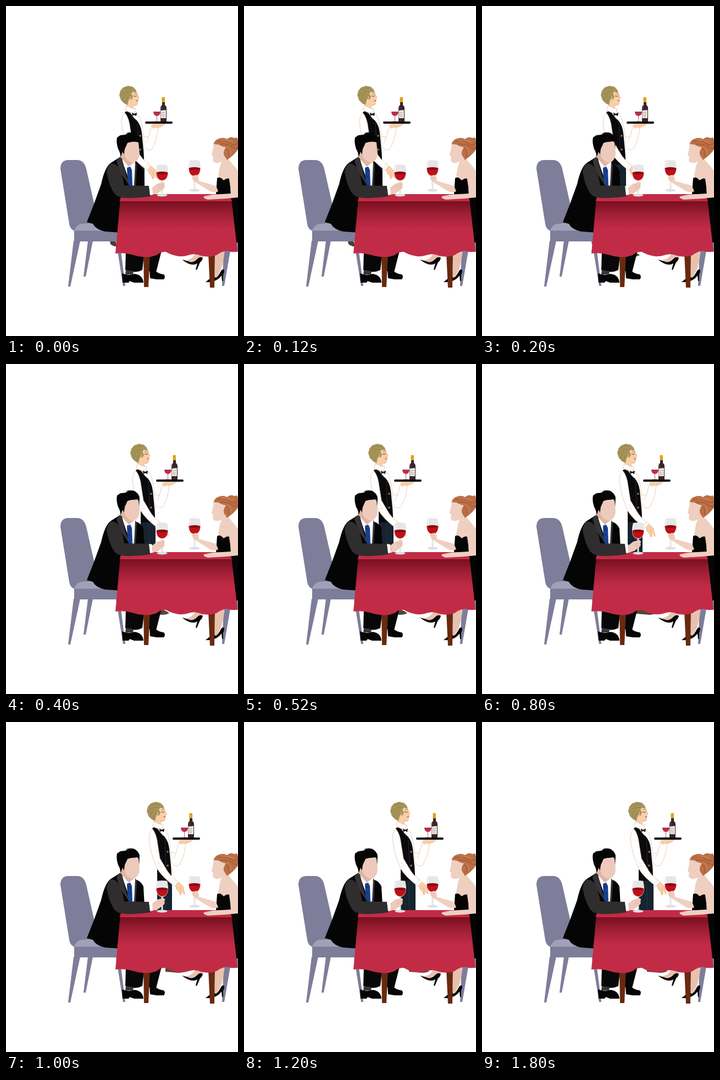
An HTML page with a canvas that plays this animation: 422x600 px, repeating every 2.2 s.

```html
<!DOCTYPE html>
<html lang="en">
<head>
<meta charset="utf-8">
<title>Dinner for two</title>
<style>
html, body { margin: 0; width: 100%; height: 100%; overflow: hidden; background: #fff; }
canvas { display: block; width: 422px; height: 600px; }
</style>
</head>
<body>
<canvas id="stage"></canvas>
<script>
const W = 422, H = 600, LOOP = 2200, STEP = 200, STRIDE = 10, LAST = 6;
const canvas = document.getElementById('stage');
const ctx = canvas.getContext('2d');
const ratio = window.devicePixelRatio || 1;
canvas.width = W * ratio;
canvas.height = H * ratio;

const SKIN = '#efcfc0', FACE = '#edcabb', SHADE = '#dfb5a3', LEG = '#e8c1ae';
const BLACK = '#050505', SLEEVE = '#2f2d2e';
const CHAIR = '#7e7d9a', SEAT = '#a0a1b9', WOOD = '#69290f', CLOTH = '#c22b46';
const WAITER_SKIN = '#f9cfa8', LINE = '#e3b99a';

function fill(color, d) {
  ctx.fillStyle = color;
  ctx.fill(new Path2D(d));
}

function line(color, width, d) {
  ctx.strokeStyle = color;
  ctx.lineWidth = width;
  ctx.stroke(new Path2D(d));
}

function outlined(color, edge, d) {
  fill(color, d);
  line(edge, 0.7, d);
}

function oval(color, x, y, rx, ry) {
  ctx.fillStyle = color;
  ctx.beginPath();
  ctx.ellipse(x, y, rx, ry, 0, 0, Math.PI * 2);
  ctx.fill();
}

function fade(y0, y1, ...colors) {
  const g = ctx.createLinearGradient(0, y0, 0, y1);
  colors.forEach((c, i) => g.addColorStop(i / (colors.length - 1), c));
  return g;
}

function waiterHead() {
  fill(WAITER_SKIN, 'M219 168 L219 185 L233 188 L232 181 Q238 182 239 178 L240 171 L242 167 L238 157 L226 156Z');
  line('#d99d78', 0.6, 'M238 158 L239 162 L242 167 L240 169 L240 173 L239 178 Q237 182 231 180');
  line('#4b3424', 0.9, 'M232 163.5 Q235 165 238 163.5');
  line('#8a7440', 0.7, 'M232 160 Q235 158.5 238 160');
  line('#cf4d46', 1.3, 'M236.5 172.5 L240 172');
  fill('#a59359', 'M206 162 L208 154 L213 148 L222 145 L231 147 L236 152 L238 158 L231 156 L228 159 L231 165 L228 171 L225 168 L223 172 L221 180 L215 177 L209 171Z');
  line('#8a7947', 0.7, 'M211 154 Q219 147 229 150 M209 163 Q215 153 228 156 M213 173 Q213 163 221 158 M218 177 Q217 169 224 163');
  line('#eab98c', 1.2, 'M225 164 Q228 166 226 170');
}

function serving() {
  fill(WAITER_SKIN, 'M265 219 Q264 214 271 213 H289 Q294 214 288 216 Q281 221 274 221 L267 223Z');
  line('#dba582', 0.6, 'M288 216 Q281 221 274 221');
  // glass
  fill('#b62f4b', 'M268 192 H281 Q281 199 274.5 200 Q268 199 268 192Z');
  line('#a83b50', 0.8, 'M274.5 200 V210 M270 210 H279');
  // bottle
  fill('#38252a', 'M284 173 H289 V180 Q292 182 292 186 V211 H281 V186 Q281 182 284 180Z');
  fill('#dca514', 'M283.5 166 Q286.5 165 289 166 V175 H283.5Z');
  fill('#ece6df', 'M281.5 190 L291 189 V204 H281.5Z');
  line('#9c8c85', 0.8, 'M283 194 H289 M283 198 H289 M284 201 H288');
  line('#6e5055', 1, 'M283 183 V189');
  ctx.fillStyle = '#0d080b';
  ctx.beginPath();
  ctx.roundRect(253, 210, 50, 4, 2);
  ctx.fill();
}

function waiter() {
  fill('#4e3c30', 'M189 427 L199 428 L203 437 Q196 438 190 433Z');
  fill('#594535', 'M240 446 L262 445 Q274 450 277 453 Q272 456 264 456 L240 454Z');
  fill('#17232e', 'M225 262 L250 260 L252 300 V350 H225Z');
  line('#2b3945', 0.8, 'M239 290 L241 342');
  // far arm and shirt front
  outlined('#fff', LINE, 'M231 190 Q242 196 245 207 Q249 222 250 237 L259 239 L265 217 L277 219 Q276 240 266 259 Q262 264 255 260 L247 251 L235 225 L225 194Z');
  line(LINE, 0.6, 'M250 237 L251 253 M259 239 L255 249');
  waiterHead();
  fill('#090a0c', 'M216 193 L223 190 Q230 202 238 208 Q245 216 247 230 L250 262 L251 288 H226 L225 268 Q229 250 225 230Z');
  line('#30343a', 0.8, 'M226 194 Q234 207 239 211 L242 280');
  oval('#a77a55', 244, 236, 1.7, 1.7);
  oval('#a77a55', 244, 261, 1.7, 1.7);
  outlined('#fff', '#dfb89f', 'M219 181 L230 186 L236 187 L234 194 L226 194 L217 190Z');
  fill('#0b0b0d', 'M229 194 L233 196 L238 194 L237 200 L233 198 L230 200Z');
  // near arm
  fill(WAITER_SKIN, 'M258 295 L264 291 L272 299 L274 309 L276 314 L272 312 L269 305 L270 314 L267 315 L264 308 L260 304Z');
  line('#d89c72', 0.7, 'M258 296 L261 304 L265 309 L267 315 M266 301 L270 311 M264 291 L272 299 L275 313');
  outlined('#fff', '#dfb89f', 'M216 194 Q211 199 210 210 Q212 231 217 246 L225 267 Q235 283 257 299 L263 290 Q248 280 240 265 L230 248 L226 223 Q224 203 216 194Z');
  line(LINE, 0.6, 'M225 255 L231 259 M226 262 L233 263 M254 294 L259 287');
  serving();
}

function chairs() {
  fill(CHAIR, 'M99 296 Q99 280 114 280 H129 Q142 280 146 296 L170 402 L130 410 Q117 409 115 396Z');
  fill(CHAIR, 'M123 427 H135 L117 510 H113Z M149 427 H158 L145 492 H141Z M200 427 L209 445 L217 509 H213Z');
  fill(SEAT, 'M124 409 Q127 398 137 396 L170 394 L207 411Z');
  fill(CHAIR, 'M124 408.500 H207 V428 H124Z');
  fill(CHAIR, 'M396 445 H408 L397 509 H393Z M411 420 H422 V447 H405Z');
}

function legs() {
  fill('#080808', 'M218 445 H252 L248 480 Q234 487 217 480Z M251 445 H283 L273 484 L259 482Z');
  fill('#3a3637', 'M218 480 L232 482 L231 488 H217Z');
  fill(BLACK, 'M211 486 Q222 491 234 487 Q249 489 250 503 H233 L225 500 L223 503 H212Z M261 479 L272 482 Q278 487 287 488 Q291 492 287 497 H274 L262 495Z');
  fill(LEG, 'M329 462 Q338 461 345 450 H364 L355 460 L347 467 L333 469Z');
  fill(LEG, 'M380 445 L398 443 Q396 464 391 479 L384 492 L377 498 L380 479Z');
  fill(BLACK, 'M320 461 L331 464 Q340 469 349 459 Q353 455 358 458 Q357 463 353 466 L347 480 L345 479 L348 468 Q338 475 320 461Z');
  fill(BLACK, 'M363 502 Q372 494 379 492 Q382 499 391 482 Q393 477 397 480 Q397 486 395 488 L395 500 H393 L392 490 Q383 503 363 502Z');
  fill(WOOD, 'M250 450 H262 L259 511 H251Z M368 450 H380 L379 512 H371Z');
}

function manBody() {
  fill(BLACK, 'M207 275 L191 285 Q180 292 173 324 L160 360 L147 393 L158 396 Q163 406 180 410 L208 412 L215 349 L252 335 L250 299 Q245 289 237 287 L226 281Z');
  fill('#fff', 'M210 276 L235 284 L236 296 L233 327 L228 327 Q218 303 210 276Z');
  fill(SHADE, 'M208 262 L216 258 L234 284 L223 292 L211 278 Q208 274 208 262Z');
  fill('#193f91', 'M220 294 L226 292 L229 298 L230 326 L225 328 L221 322Z');
  line('#0c275e', 1, 'M221 299 L228 302 M223 309 L229 315');
  fill('#353335', 'M206 275 L211 277 Q216 303 224 326 L208 303 L201 282Z M235 284 L238 289 L236 327 L233 327Z');
  fill(BLACK, 'M208 276 Q209 268 204 260 Q200 248 202 239 L208 235 L217 234 L222 231 L216 232 Q226 228 234 231 L239 235 Q243 240 243 244 L242 262 L239 246 L222 249 L216 262 L215 270 L212 265Z');
  fill(FACE, 'M221 249 Q232 245 241 248 L243 268 Q242 283 230 285 Q218 282 215 269 L216 260Z');
}

function womanBody() {
  fill(SKIN, 'M394 267 Q394 281 389 292 L386 309 Q390 320 403 324 L422 340 V300 Q414 289 404 278Z');
  fill(SKIN, 'M378 246 L377 258 L374 271 L377 274 L376 281 Q380 288 390 284 L398 278 L400 255Z');
  fill(BLACK, 'M384 313 Q389 309 396 317 Q402 312 406 314 L409 334 L422 348 V430 H408 L401 353 L382 342Z');
  fill('#bb6f46', 'M378 250 Q381 242 388 241 Q395 238 402 242 Q409 236 415 240 L420 239 L422 243 V261 Q415 271 402 280 L399 275 Q394 270 397 262 L400 257 Q391 255 387 252 L378 251Z');
  line('#96502e', 1, 'M384 247 Q397 242 406 249 T422 249 M389 251 Q402 250 411 256 T421 257 M400 259 Q407 262 405 274');
  line('#d4946a', 1, 'M391 244 Q403 243 414 247 M402 255 Q413 264 408 270');
}

function table() {
  fill(fade(352, 405, '#730d1b', '#a01f36', CLOTH), 'M208 350 H410 L421 446 Q413 449 402 445 Q392 446 383 453 Q369 458 355 454 Q343 449 332 453 Q320 457 309 454 Q299 452 291 447 Q281 446 274 453 Q261 458 248 456 Q238 455 229 452 Q214 448 199 450Z');
  fill(CLOTH, 'M215 342 H406 L411 355 H207 Q208 345 215 342Z');
}

function glass(x, y, stem) {
  ctx.save();
  ctx.translate(x, y);
  fill('#e6e6e6', `M-9 0 Q0 -1.500 9 0 C13 14 11 27 1.500 29 V${stem} H-1.500 V29 C-11 27 -13 14 -9 0Z`);
  fill('#c01019', 'M-10.500 14 H10.500 C10 23 6 28 0 28 S-10 23 -10.500 14Z');
  oval('#8d0711', 0, 14.5, 10.3, 2.5);
  line('#f7f7f7', 1.2, 'M-7.500 3 Q-9 8 -8.500 11');
  oval('#dedfe0', 0, stem + 1, 9.5, 2.5);
  ctx.restore();
}

function arms() {
  // man
  fill(SLEEVE, 'M191 286 Q201 286 206 296 Q213 310 215 326 L260 327 L263 346 Q240 350 218 349 Q204 349 197 341 Q187 326 183 302 Q184 291 191 286Z');
  fill('#fff', 'M260 327 L266 328 L267 343 L262 344Z');
  glass(284, 289, 54);
  fill(FACE, 'M266 330 L275 323 L286 320 Q291 322 288 326 Q290 330 286 333 L277 340 L267 343Z');
  line('#d8aa98', 0.7, 'M277 326 L288 326 M278 330 L287 330');
  // woman
  glass(343, 281, 53);
  fill(SKIN, 'M339 309 L346 307 Q352 310 351 318 L382 327 L386 337 Q379 341 370 336 L344 320 Q337 316 339 309Z');
  line('#d8aa98', 0.7, 'M339 312 L347 312 M341 316 L347 316');
  fill(SKIN, 'M405 290 Q416 286 422 302 V348 L402 350 L367 352 Q357 349 360 346 L375 343 L409 341 Q407 318 405 290Z');
  line('#dfb5a5', 0.7, 'M360 347 L374 346 M406 313 Q409 327 409 341');
}

function draw(now) {
  const t = Math.max(0, now - start) % LOOP;
  const step = Math.min(LAST, Math.floor(t / STEP));
  ctx.setTransform(ratio, 0, 0, ratio, 0, 0);
  ctx.fillStyle = '#fff';
  ctx.fillRect(0, 0, W, H);
  ctx.save();
  ctx.translate(step * STRIDE, 0);
  waiter();
  ctx.restore();
  chairs();
  legs();
  manBody();
  womanBody();
  table();
  arms();
  requestAnimationFrame(draw);
}

const start = performance.now();
draw(start);
</script>
</body>
</html>
```
